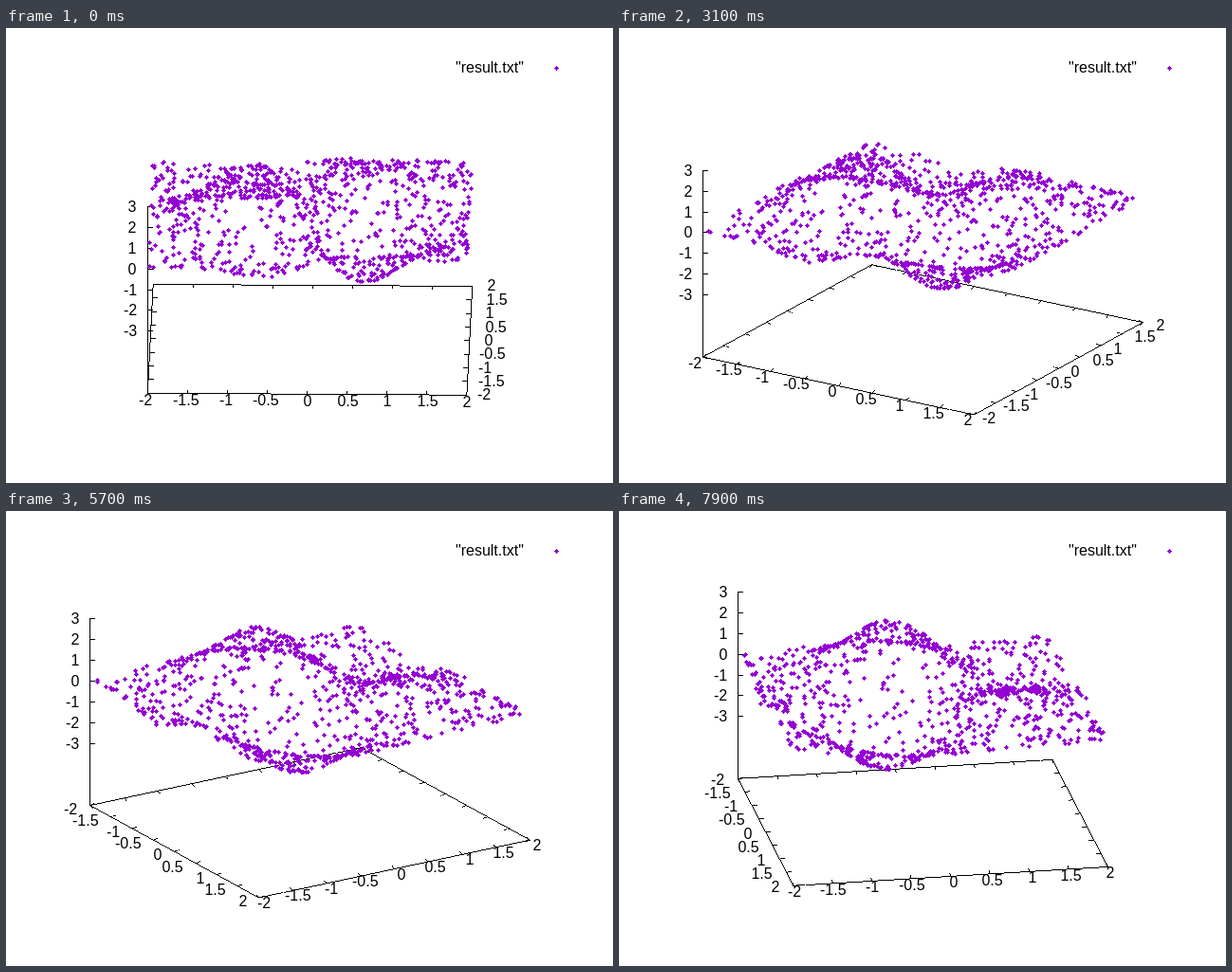
An HTML page with a canvas for the animation above (8000 ms loop, 640 by 480 pixels).

```html
<!DOCTYPE html>
<html>
<head>
<meta charset="utf-8">
<style>
html, body { margin: 0; width: 640px; height: 480px; overflow: hidden; background: #fff; }
canvas { display: block; }
</style>
</head>
<body>
<canvas id="plot" width="640" height="480"></canvas>
<script>
const ctx = document.getElementById('plot').getContext('2d');
const FRAMES = 80, STEP = 100, COUNT = 1000;
const SX = 84.15, SY = 28.7, SZ = 21.93; // pixels per unit
const BASE = -5.98; // z of the base plane
let sin, cos;

let seed = 20;
function random() {
  seed = (seed * 1664525 + 1013904223) % 4294967296;
  return seed / 4294967296;
}

const bump = (x, y, size) => size * Math.exp(-2 * (x * x + y * y));

// A hill and a pit side by side, fading into smaller waves along y
function height(x, y) {
  const d = y + 0.43 + 0.14 * Math.sin(2 * x);
  const across = x * Math.exp(-x * x) / 0.4289;
  const along = Math.exp(-0.4 * d * d) * Math.cos(1.5 * d);
  return (0.32 * x - 2.57) * across * along +
    bump(x - 0.6, y - 0.9, 0.3) + bump(x + 1, y + 2, 0.45) + bump(x - 1.9, y + 2, 0.35);
}

const points = Array.from({ length: COUNT }, () => {
  const x = random() * 4 - 2, y = random() * 4 - 2;
  return [x, y, height(x, y)];
});

function project(x, y, z) {
  return [320 + SX * (x * cos + y * sin), 197.2 + SY * (x * sin - y * cos) - SZ * z];
}

// Line of whole pixels, without smoothing
function line([x1, y1], [x2, y2]) {
  const n = Math.max(1, Math.round(Math.max(Math.abs(x2 - x1), Math.abs(y2 - y1))));
  for (let i = 0; i <= n; i++) {
    ctx.fillRect(Math.round(x1 + (x2 - x1) * i / n), Math.round(y1 + (y2 - y1) * i / n), 1, 1);
  }
}

function diamond(px, py) {
  const x = Math.round(px), y = Math.round(py);
  ctx.fillRect(x - 1, y - 1, 3, 3);
  ctx.fillRect(x - 2, y, 5, 1);
  ctx.fillRect(x, y - 2, 1, 5);
}

// align: 0 left, 0.5 centre, 1 right
function text(str, x, y, align) {
  const left = x - align * ctx.measureText(str).width;
  ctx.fillText(str, Math.round(left), Math.round(y + 6));
}

const label = v => (v < 0 ? '' : ' ') + v;

function tic([x, y], dx, dy) {
  line([x, y], [x + dx, y + dy]);
}

function drawAxes() {
  const corners = [[-2, -2], [2, -2], [2, 2], [-2, 2]].map(([x, y]) => project(x, y, BASE));
  corners.forEach((c, i) => line(c, corners[(i + 1) % 4]));
  line(corners[0], project(-2, -2, 3));

  const xAlign = sin > 0.8 ? 1 : 0.5;
  const yAlign = cos > 0.8 ? 0 : 0.5;
  for (let v = -2; v <= 2; v += 0.5) {
    const front = project(v, -2, BASE), side = project(2, v, BASE);
    tic(front, 5 * sin, -3 * cos);
    tic(project(v, 2, BASE), -5 * sin, 3 * cos);
    tic(side, -5 * cos, -3 * sin);
    tic(project(-2, v, BASE), 5 * cos, 3 * sin);
    text(label(v), front[0] - 13.5 * sin - 1, front[1] + 7 * cos, xAlign);
    text(label(v), side[0] + 12.5 * cos - 1, side[1] + 7.2 * sin - 0.6, yAlign);
  }
  for (let v = -3; v <= 3; v++) {
    const p = project(-2, -2, v);
    tic(p, 5, 0);
    text(label(v), p[0] - 11, p[1], 1);
  }
}

function draw(frame) {
  const angle = (frame + 1) * Math.PI / 180;
  sin = Math.sin(angle);
  cos = Math.cos(angle);
  ctx.fillStyle = '#fff';
  ctx.fillRect(0, 0, 640, 480);
  ctx.fillStyle = '#000';
  ctx.font = '16px "Liberation Sans", Arial, sans-serif';
  drawAxes();
  text('"result.txt"', 546, 41, 1);
  ctx.fillStyle = '#9400d3';
  diamond(580, 42);
  for (const p of points) diamond(...project(...p));
}

let shown = -1;
const start = performance.now();
function tick() {
  const frame = Math.floor((performance.now() - start) / STEP) % FRAMES;
  if (frame !== shown) draw(shown = frame);
  requestAnimationFrame(tick);
}
tick();
</script>
</body>
</html>
```
